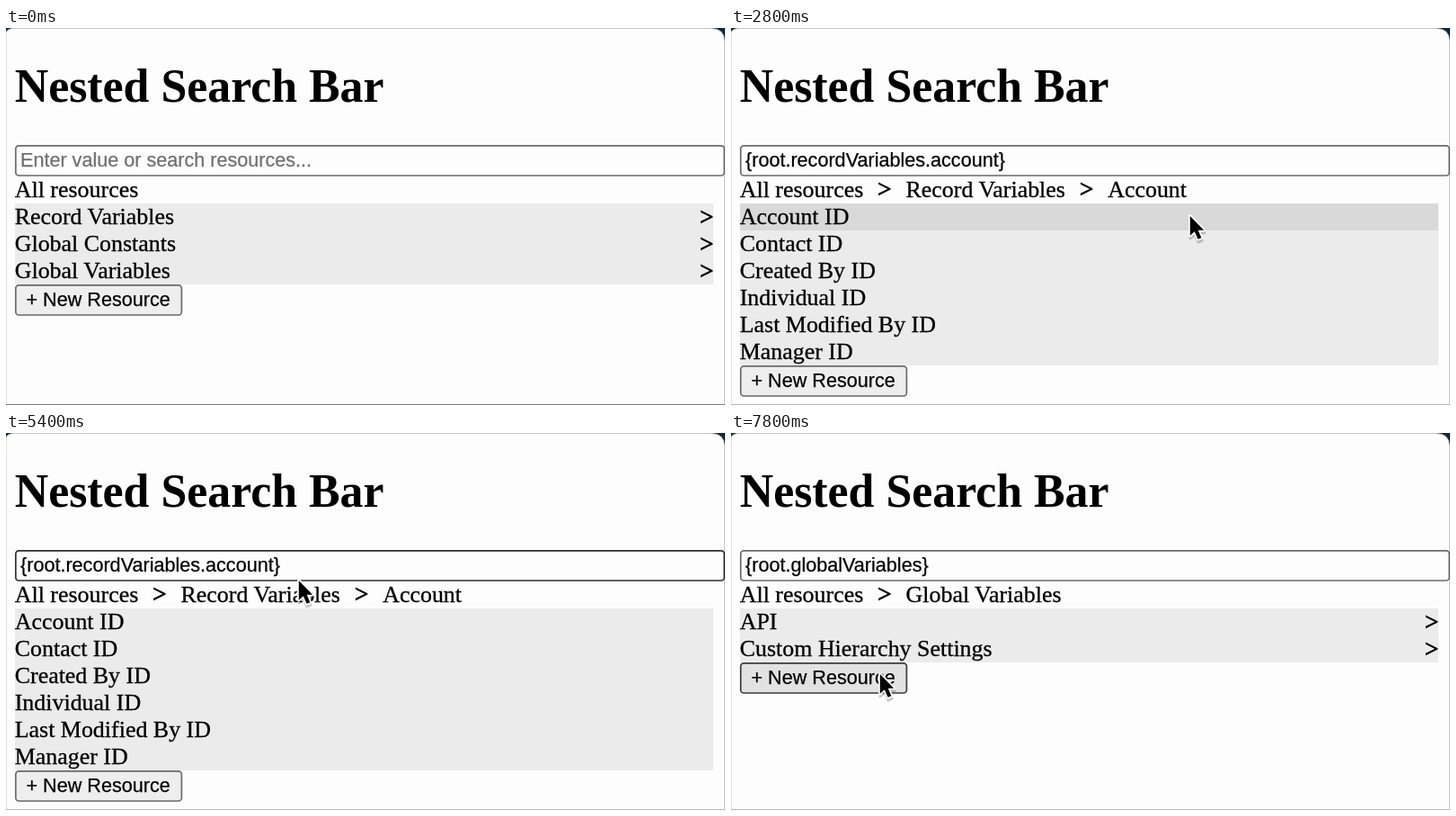
An HTML page for the animation above (8000 ms loop, 800 by 419 pixels).

```html
<!DOCTYPE html>
<html lang="en">
<head>
<meta charset="utf-8">
<title>Nested Search Bar</title>
<style>
  html, body { margin: 0; width: 100%; height: 100%; overflow: hidden; background: #fdfdfd; }
  svg { display: block; width: 100%; height: 100%; }
  .serif { font: 25.95px "Liberation Serif", "Times New Roman", Times, serif; stroke: #000; stroke-width: .3; }
  .serif rect { stroke: none; }
  .title { font: bold 51.85px "Liberation Serif", "Times New Roman", Times, serif; }
  .sans { font: 21.6px "Liberation Sans", Arial, Helvetica, sans-serif; stroke: currentColor; stroke-width: .25; }
  .more { font-size: 27px; stroke-width: .9; }
</style>
</head>
<body>
<svg viewBox="0 0 800 419">
  <rect width="800" height="419" fill="#10283c"/>
  <path d="M0 5Q2 .5 9 .5H784Q799.5 .5 799.5 15V419H0Z" fill="#fdfdfd" stroke="#c4c4c4"/>
  <rect id="base" y="418" width="800" height="1"/>
  <text class="title" x="9.7" y="82">Nested Search Bar</text>
  <rect id="field" x="10.8" y="130.8" width="788.4" height="33.2" rx="3.5" fill="#fdfdfd" stroke-width="1.7"/>
  <text id="value" class="sans" x="16" y="154.3"></text>
  <g id="list" class="serif"></g>
  <g id="button">
    <rect id="face" x="10.8" y=".8" width="184.6" height="33.2" rx="3.5" stroke-width="1.7"/>
    <text class="sans" x="22.5" y="24.3">+ New Resource</text>
  </g>
  <g id="pointer">
    <circle id="ring" cx="-.5" cy="-.5" r="49.6" fill="none" stroke="#000" stroke-width="2"/>
    <g id="arrow" stroke-linejoin="round">
      <path d="M1 3V26L6 21.3 10 30 14 28.3 10.2 19.7H17Z" fill="#000" stroke="#000" stroke-width="3" opacity=".2"/>
      <path d="M.8 1V22.8L5.8 18.2 9.6 26.8 13.4 25.2 9.7 16.8H16.2Z" stroke="#fff" stroke-width="3.4" paint-order="stroke"/>
    </g>
    <g id="hand" stroke="#000" stroke-width="1.7" stroke-linejoin="round" stroke-linecap="round">
      <path fill="#fff" d="M-2 3C-3-.5 1-1.5 2.5 1.5L6 11C7 8.5 10 9 10.5 11.5 11.5 9.5 14 10 14.5 12.5 16 11 17.5 12 17.5 14L17 20C17 23 15 24 15 28H4C3 24-4 20-7 16-9 13-6 11.5-4 13L1 16Z"/>
      <path fill="none" d="M5.5 18v6M9 18v6M12.5 18v6"/>
    </g>
  </g>
</svg>
<script>
const LOOP = 8000, STEP = 100, TOP = 195, ROW = 30;
const $ = id => document.getElementById(id);

const root = { crumbs: ['All resources'], rows: ['Record Variables', 'Global Constants', 'Global Variables'], more: true };
const records = { value: '{root.recordVariables}', crumbs: ['All resources', 'Record Variables'], rows: ['Account'], more: true };
const account = {
  value: '{root.recordVariables.account}',
  crumbs: ['All resources', 'Record Variables', 'Account'],
  rows: ['Account ID', 'Contact ID', 'Created By ID', 'Individual ID', 'Last Modified By ID', 'Manager ID']
};
const globals = {
  value: '{root.globalVariables}', crumbs: ['All resources', 'Global Variables'],
  rows: ['API', 'Custom Hierarchy Settings'], more: true
};

// [start time, view]
const views = [
  [0, root], [1600, records], [2400, account], [5900, records],
  [6500, { ...root, value: '{root}' }], [7800, globals]
];

// [time, x, y] of the pointer tip
const path = [
  [300, 640, 425], [1200, 510, 212], [1400, 510, 212], [1500, 510, 208],
  [3000, 510, 208], [3200, 507, 241], [3700, 507, 241], [3800, 507, 240],
  [4100, 470, 346], [4200, 465, 340], [4500, 350, 215], [4900, 350, 215],
  [5200, 326, 158], [5300, 326, 158], [5400, 325, 163], [5700, 290, 182],
  [5900, 290, 182], [6200, 130, 183], [6400, 110, 183], [6900, 110, 183],
  [7000, 158, 232], [7100, 163, 238], [7600, 165, 267], [8000, 165, 267]
];
const presses = [1500, 2300, 5800, 6400];

function tip(t) {
  const i = path.findIndex(p => p[0] >= t);
  if (i < 1) return path[0].slice(1);
  const [t0, x0, y0] = path[i - 1], [t1, x1, y1] = path[i];
  const u = (t - t0) / (t1 - t0), k = u * u * (3 - 2 * u);
  return [x0 + (x1 - x0) * k, y0 + (y1 - y0) * k];
}

function text(x, y, str, extra = '') {
  return `<text x="${x}" y="${y}" ${extra}>${str}</text>`;
}

function crumbLine(crumbs) {
  const gap = '<tspan dx="16" class="more">&gt;</tspan><tspan dx="16">';
  return text(9.7, 188.4, crumbs.map((c, i) => i ? gap + c + '</tspan>' : c).join(''));
}

function rowLine(label, i, more, hover) {
  const y = TOP + i * ROW;
  return `<rect x="10" y="${y}" width="777" height="${ROW}" fill="${hover ? '#d9d9d9' : '#ebebeb'}"/>` +
    text(9.7, y + 23.4, label) +
    (more ? text(787.3, y + 23.6, '&gt;', 'text-anchor="end" class="more"') : '');
}

const show = (id, on) => $(id).setAttribute('display', on ? 'inline' : 'none');
const paint = (id, attr, color) => $(id).setAttribute(attr, color);

function draw(t) {
  const view = views.filter(v => v[0] <= t).pop()[1];
  const [x, y] = tip(t);
  // hover styles follow the pointer one step late
  const [hx, hy] = tip(t - STEP);
  const active = t >= 400, pressed = presses.includes(t);
  const inside = active && hx > 10 && hx < 787;
  const hot = inside ? Math.floor((hy - TOP) / ROW) : -1;
  const end = TOP + view.rows.length * ROW;
  const onField = inside && hy >= 130 && hy < 164.5;
  const onButton = inside && hx < 196 && hy >= end && hy < end + 35;

  paint('base', 'fill', active ? '#b4b4b4' : '#7c7c7c');
  paint('field', 'stroke', onField ? '#2e2e2e' : '#6b6b6b');
  const ink = view.value ? '#000' : '#6f6f6f';
  $('value').textContent = view.value || 'Enter value or search resources...';
  paint('value', 'fill', ink);
  paint('value', 'color', ink);
  $('list').innerHTML = crumbLine(view.crumbs) +
    view.rows.map((r, i) => rowLine(r, i, view.more, i === hot)).join('');

  $('button').setAttribute('transform', `translate(0 ${end})`);
  paint('face', 'fill', onButton ? '#e2e2e2' : '#eeeeee');
  paint('face', 'stroke', onButton ? '#3c3c3c' : '#6b6b6b');

  show('pointer', active);
  show('ring', pressed);
  show('hand', pressed);
  show('arrow', !pressed);
  $('pointer').setAttribute('transform', `translate(${x} ${y})`);
}

let last = -1;
function tick() {
  const t = Math.floor(performance.now() % LOOP / STEP) * STEP;
  if (t !== last) draw(last = t);
  requestAnimationFrame(tick);
}
tick();
</script>
</body>
</html>
```
